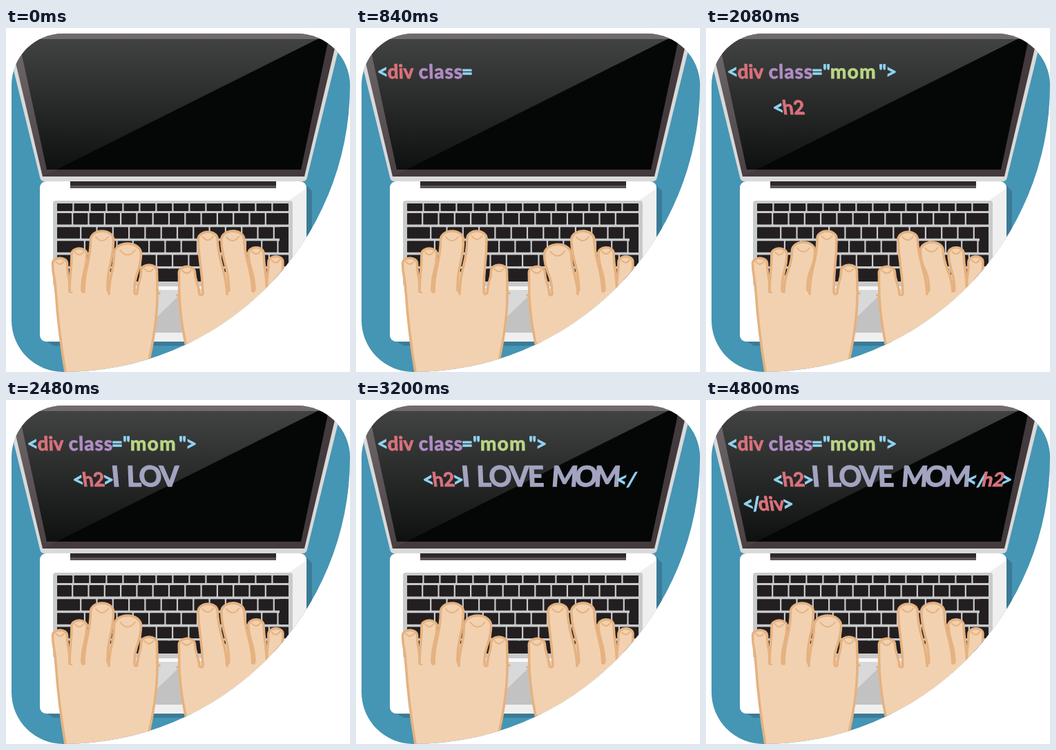
An HTML page that plays this animation: 498x498 px, repeating every 5600 ms.

```html
<!DOCTYPE html>
<html lang="en">
<head>
<meta charset="utf-8">
<title>Typing on a laptop</title>
<style>
  html, body { margin: 0; width: 100%; height: 100%; overflow: hidden; background: #fff; }
  svg { display: block; width: 100vw; height: 100vh; }
  text { font-family: Lato, "Open Sans", sans-serif; font-weight: 700; white-space: pre; stroke-width: .032em; }
  .skin { fill: #f2d1b0; stroke: #e5b280; stroke-width: 3.6; stroke-linecap: round; stroke-linejoin: round; }
  .skin .palm { stroke: none; }
  .skin .line { fill: none; }
  .skin .nail { fill: none; stroke-width: 2; }
</style>
</head>
<body>
<svg viewBox="0 0 498 498" xmlns="http://www.w3.org/2000/svg">
  <defs>
    <clipPath id="card">
      <path d="M83 8H421A77 75 0 0 1 498 83A415 415 0 0 1 83 498A75 75 0 0 1 8 423V83A75 75 0 0 1 83 8Z"/>
    </clipPath>
    <linearGradient id="glare" gradientUnits="userSpaceOnUse" x1="0" y1="8" x2="0" y2="215">
      <stop offset="0" stop-color="#fff" stop-opacity=".25"/>
      <stop offset="1" stop-color="#fff" stop-opacity=".03"/>
    </linearGradient>
  </defs>
  <g clip-path="url(#card)">
    <rect width="498" height="498" fill="#4595b4"/>

    <path d="M59 454L69 460H433Q443 460 443 450V236L435 228Z" fill="#3b7b97"/>
    <rect x="49" y="222" width="386" height="232" rx="9" fill="#fff"/>
    <path d="M435 232L412 248L250 388L180 454H426Q435 454 435 445Z" fill="#efefef"/>

    <path d="M-2 8H487L436 216Q435 222 429 222H56Q50 222 49 216Z" fill="#d9d9d9"/>
    <path d="M4 8H481L432 215H53Z" fill="#433a3d"/>
    <path d="M18 16H467L427 205H59Z" fill="#050706"/>
    <path d="M4 8H467L53 215Z" fill="url(#glare)"/>
    <path d="M93 222H391V232H93Z" fill="#5b5456"/>
    <path d="M93 222H391V228H93Z" fill="#2f282a"/>

    <rect x="68" y="250" width="347" height="124" rx="4" fill="#c9cacc"/>
    <rect x="68" y="374" width="347" height="4" fill="#f7f7f7"/>
    <g id="keys" fill="#231f20"></g>
    <rect x="175" y="379" width="134" height="62" rx="3" fill="#d9d9d9"/>
    <path d="M259 379H309V441H195Z" fill="#c2c2c2"/>

    <g id="code"></g>
    <g id="left" class="skin"></g>
    <g id="right" class="skin" transform="rotate(-2 326 300) translate(467) scale(-1 1)"></g>
  </g>
</svg>
<script>
const LOOP = 5600;
const $ = id => document.getElementById(id);

// Keyboard: every row starts with one key of its own width, the last key takes what is left
const EDGE = 409, GAP = 2.2;
const key = (a, b, y, h) => `<rect x="${a}" y="${y}" width="${b - a}" height="${h}" rx=".8"/>`;
function keyRow(second, row) {
  const y = row ? 248 + row * 20.1 : 254;
  const h = row ? 16.5 : 11;
  const pitch = row ? 23.3 : 24;
  let keys = key(74, second - GAP, y, h), x = second;
  for (; EDGE - x > pitch * 1.5; x += pitch) keys += key(x, x + pitch - GAP, y, h);
  return keys + key(x, EDGE, y, h);
}
$('keys').innerHTML = [98.5, 97.3, 109.3, 115, 102.4, 97.5].map(keyRow).join('') +
  key(396, EDGE, 288, 37) + key(170, 313, 348.5, 18.5);

// Code on screen: text, x, colour, letter spacing
const BLUE = '#8fd3f3', RED = '#d9717c', VIOLET = '#b08cc5', GREEN = '#b9d584', LILAC = '#a2a4c0';
const lines = [
  { y: 73, slant: .05, parts: [['<', 31, BLUE], ['div', 46, RED], ['class', 91, VIOLET, 1],
    ['="', 153, BLUE], ['mom', 180, GREEN, 1.4], ['">', 250, BLUE, -1]] },
  { y: 125, slant: .23, parts: [['<', 98, BLUE], ['h2', 112, RED], ['>', 141, BLUE],
    ['I', 154, LILAC], ['LOVE', 175, LILAC, -2.2], ['MOM', 282, LILAC, -5],
    ['</', 375, BLUE], ['h2', 398, RED], ['>', 425, BLUE]] },
  { y: 160, slant: .23, parts: [['</', 55, BLUE, -3], ['div', 77, RED], ['>', 112, BLUE]] }
];
const parts = lines.flatMap(({ y, slant, parts }) => parts.map(([str, x, color, gap = 0]) => {
  // letters lean outwards with the perspective of the lid
  const lean = (x + str.length * 8 - 242) / 192 * slant;
  const el = document.createElementNS('http://www.w3.org/2000/svg', 'text');
  el.setAttribute('transform', `matrix(1 0 ${-lean} 1 ${x} ${y})`);
  el.setAttribute('fill', color);
  el.setAttribute('stroke', color);
  el.setAttribute('font-size', color === LILAC ? 41 : 28);
  el.setAttribute('letter-spacing', gap);
  $('code').appendChild(el);
  return { str, el };
}));

// A finger runs from two base points at height y up to a blunt tip of radius r
function finger(x1, x2, y, cx, top, r) {
  const shoulder = top + r * .75;
  const bend = (y - shoulder) * .45;
  const hook = y - 6;
  return `<path d="M${x1} ${y}C${x1} ${y - bend} ${cx - r} ${shoulder + bend} ${cx - r} ${shoulder}` +
    `A${r} ${r * .75} 0 0 1 ${cx + r} ${shoulder}` +
    `C${cx + r} ${shoulder + bend} ${x2} ${hook - bend} ${x2} ${hook}Q${x2 - 1} ${y + 1} ${x2 + 3} ${y}"/>` +
    `<path class="nail" d="M${cx - r * .55} ${top + r * .5}q${r * .55} ${r * .7} ${r * 1.1} 0"/>`;
}

// A left hand; the right one is its mirror image
function hand(pressed) {
  return '<path class="palm" d="M72 382L92 366L113 358L150 352L187 376L219 382Q219 430 203 498H86Q76 440 72 382Z"/>' +
    '<path class="line" d="M72 380Q76 440 86 498M219 378Q220 430 203 498"/>' +
    finger(72, 92, 382, 78, 333, 10.5) +
    finger(92, 110, 382, 106, 319, 11) +
    (pressed === 'middle' ? finger(113, 147, 381, 141, 310, 16.5) : finger(113, 147, 381, 139, 294, 16.5)) +
    (pressed === 'index' ? finger(149, 186, 385, 176, 312, 19.5) : finger(150, 185, 385, 175, 294, 14)) +
    finger(190, 219, 384, 207, 343, 11.5);
}
const poses = [
  { left: 'index', right: '' },
  { left: 'middle', right: 'middle' },
  { left: '', right: 'index' }
];

// Bursts of typing: start, number of keys, interval
const strokes = [
  [40, 4], [440, 6], [1000, 1], [1200, 5], [1880, 7], [2480, 2, 120],
  [2800, 3], [3120, 2], [3760, 3, 40], [4120, 5, 70], [4800, 1]
].flatMap(([start, n, gap = 80]) => Array.from({ length: n }, (_, i) => start + i * gap));

let shown = -1;
function draw(now) {
  const t = now % LOOP;
  const typed = strokes.filter(s => s <= t).length;
  if (typed === shown) return;
  shown = typed;
  let rest = typed;
  for (const { str, el } of parts) {
    el.textContent = str.slice(0, Math.max(0, rest));
    rest -= str.length;
  }
  // the space in the first line moves the hands one pose ahead until the quote
  const ahead = typed > 4 && typed < 12 ? 1 : 0;
  const pose = poses[(typed + ahead) % poses.length];
  $('left').innerHTML = hand(pose.left);
  $('right').innerHTML = hand(pose.right);
}
function tick() {
  draw(performance.now());
  requestAnimationFrame(tick);
}
tick();
</script>
</body>
</html>
```
